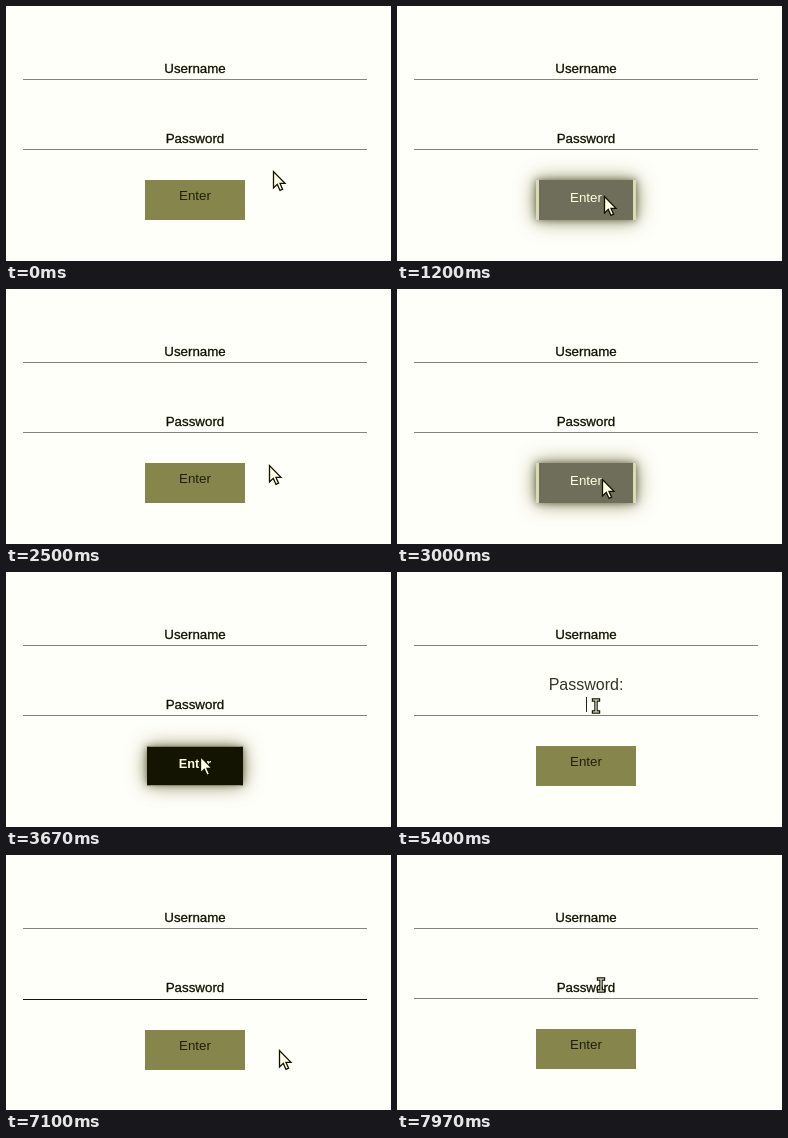
These frames come from a looping animation (385 by 255 pixels, 8000 ms). An HTML page:

```html
<!DOCTYPE html>
<html lang="en">
<head>
<meta charset="utf-8">
<style>
html, body { margin: 0; width: 100%; height: 100%; overflow: hidden; }
#stage {
  position: relative; width: 385px; height: 255px; overflow: hidden;
  background: #fffffa; color: #111100;
  font: 13.333px/16px "Liberation Sans", Arial, sans-serif;
}
#stage > * { position: absolute; }
.label { left: 17px; width: 344px; text-align: center; -webkit-text-stroke: .3px; }
.line { left: 17px; width: 344px; height: 1px; background: #84847b; }
#raised { top: 105px; font-size: 16px; color: #343428; -webkit-text-stroke: 0; }
#caret { left: 189px; top: 125px; width: 1px; height: 15px; background: #222; }
#button {
  left: 139px; width: 100px; height: 40px; box-sizing: border-box;
  border: 0 solid; text-align: center;
}
#button span { position: absolute; left: 0; right: 0; }
svg { left: 0; top: 0; overflow: visible; }
</style>
</head>
<body>
<div id="stage">
  <div class="label" style="top:55px">Username</div>
  <div class="line" style="top:73px"></div>
  <div class="label" id="placeholder" style="top:125px">Password</div>
  <div class="label" id="raised">Password:</div>
  <div id="caret"></div>
  <div class="line" id="passwordLine"></div>
  <div id="button"><span>Enter</span></div>
  <svg width="1" height="1">
    <g id="cursor">
      <path id="arrow" d="M.5 .5V17L4.3 13.4L7 19.4L9.6 18.2L7 12.4H12Z"
        fill="#ffffe4" stroke="#111100" stroke-width="1.3"/>
      <g id="beam" fill="none" stroke-linecap="square">
        <path d="M-2.5-6H2.5M0-6V6M-2.5 6H2.5" stroke="#111100" stroke-width="3.4"/>
        <path d="M-2.5-6H2.5M0-6V6M-2.5 6H2.5" stroke="#fffff0" stroke-width="1.1"/>
      </g>
    </g>
  </svg>
</div>
<script>
const LOOP = 8000;
const el = id => document.getElementById(id);
const button = el("button"), buttonText = button.firstElementChild;

// Pointer stops: time, x, y
const path = [
  [0, 267, 165], [870, 267, 165], [1130, 207, 190], [1500, 207, 190],
  [1750, 201, 187], [2100, 208, 189], [2400, 263, 176], [2620, 263, 176],
  [2950, 205, 190], [3350, 194, 184], [4180, 194, 184], [4650, 199, 134],
  [6350, 199, 134], [6650, 260, 153], [6930, 273, 195], [7200, 273, 195],
  [7500, 262, 158], [7800, 204, 130], [8000, 204, 130]
];

const ease = p => p * p * (3 - 2 * p);
const ramp = (t, start, length) => ease(Math.min(1, Math.max(0, (t - start) / length)));
const pulse = (t, start, end, length) => ramp(t, start, length) - ramp(t, end, length);
const mix = (a, b, p) => a + (b - a) * p;
const blend = (a, b, p) => a.map((v, i) => mix(v, b[i], p));
const rgb = c => `rgb(${c.map(Math.round)})`;

function pointerAt(t) {
  const i = path.findIndex(stop => stop[0] > t);
  const [t0, x0, y0] = path[i - 1], [t1, x1, y1] = path[i];
  const p = ease((t - t0) / (t1 - t0));
  return [mix(x0, x1, p), mix(y0, y1, p)];
}

function drawButton(t, shift) {
  const hover = pulse(t, 960, 2210, 200) + pulse(t, 2720, 4260, 200);
  const press = pulse(t, 3450, 3960, 80);
  const fill = blend(blend([133, 133, 76], [110, 110, 90], hover), [20, 20, 2], press);
  const text = blend([32, 32, 10], [255, 255, 225], hover);
  const side = blend([218, 218, 180], fill, press);
  Object.assign(button.style, {
    top: 174 + shift + "px",
    background: rgb(fill),
    color: rgb(text),
    borderWidth: `0 ${3 * hover}px`,
    borderColor: rgb(side),
    boxShadow: `0 0 ${7 * hover}px rgba(50,50,40,${0.6 * hover}),
      0 0 ${20 * hover}px rgba(95,95,25,${0.75 * hover})`,
    transform: `scale(${1 - 0.04 * press})`,
    fontWeight: press > 0.5 ? 700 : 400
  });
  buttonText.style.top = 8 + 2 * hover + "px";
}

function drawPassword(t, shift) {
  const focus = pulse(t, 5150, 6880, 150);
  el("placeholder").style.opacity = 1 - focus;
  el("raised").style.opacity = focus;
  el("raised").style.transform = `translateY(${20 * (1 - focus)}px)`;
  el("caret").style.opacity = focus > 0.5 && (t - 5150) % 1060 < 530 ? 1 : 0;
  const dark = pulse(t, 5500, 7300, 300);
  el("passwordLine").style.top = 143 + shift + "px";
  el("passwordLine").style.background = rgb(blend([132, 132, 123], [20, 20, 8], dark));
}

function drawPointer(t) {
  const [x, y] = pointerAt(t);
  const overField = y < 143 && x > 17 && x < 361;
  el("cursor").setAttribute("transform", `translate(${Math.round(x)} ${Math.round(y)})`);
  el("arrow").style.display = overField ? "none" : "";
  el("beam").style.display = overField ? "" : "none";
}

function frame() {
  const t = performance.now() % LOOP;
  const shift = t > 5650 && t < 7430 ? 1 : 0;
  drawButton(t, shift);
  drawPassword(t, shift);
  drawPointer(t);
  requestAnimationFrame(frame);
}
frame();
</script>
</body>
</html>
```
